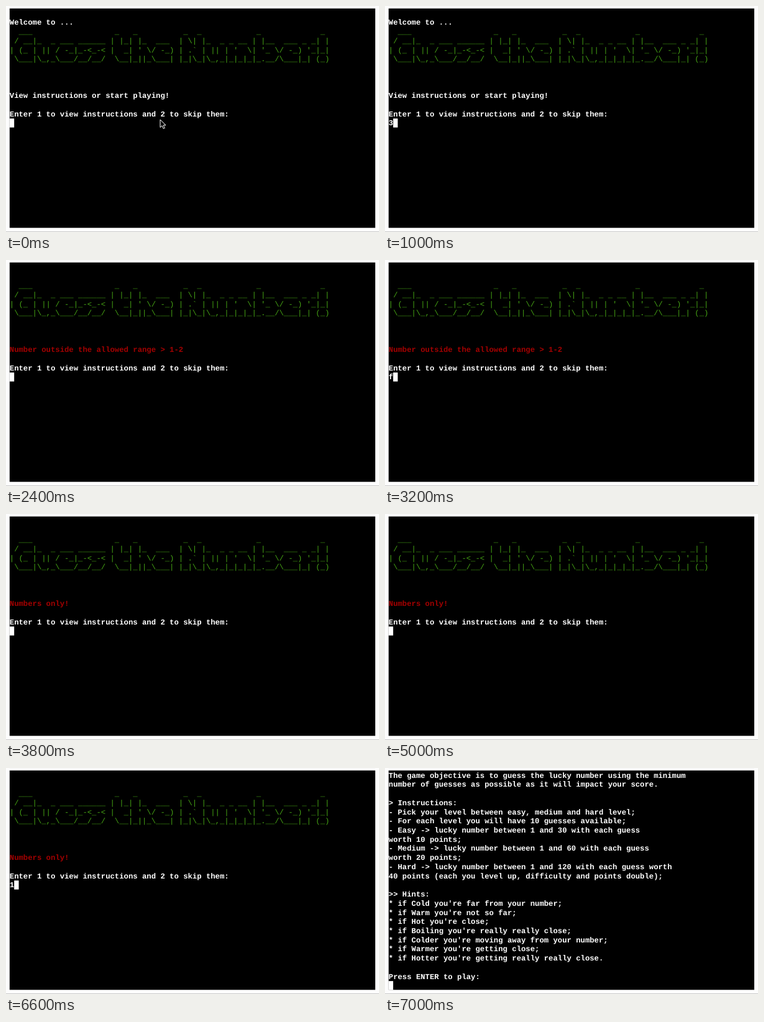
An HTML page that plays this animation: 600 by 364 pixels, repeating every 8000 ms.

```html
<!DOCTYPE html>
<html lang="en">
<head>
<meta charset="utf-8">
<title>Guess the Number</title>
<style>
  html, body { margin: 0; width: 100%; height: 100%; overflow: hidden; background: #fdfdfd; }
  svg { display: block; width: 600px; height: 364px; }
  text {
    font: bold 12.25px "Liberation Mono", "Courier New", monospace;
    text-rendering: geometricPrecision;
    white-space: pre;
    fill: #fff;
  }
  .error { fill: #a30000; }
  .banner { font-weight: normal; fill: #45a314; }
</style>
</head>
<body>
<svg viewBox="0 0 600 364">
  <rect width="600" height="364" fill="#fdfdfd"/>
  <rect y="363" width="600" height="1" fill="#c8c8c8"/>
  <rect x="5.8" y="4" width="588.2" height="353.3" fill="#000"/>
  <g id="screen"></g>
  <rect id="caret" width="7.35" height="14.4" fill="#fff"/>
  <path id="pointer" d="M248 183v12.5l3-2.7 2.2 4.8 2.1-1-2.2-4.6h3.9z" fill="#000" stroke="#fff"/>
</svg>

<script type="text/plain" id="banner">
  ___                  _   _          _  _            _             _
 / __|_  _ ___ ______ | |_| |_  ___  | \| |_  _ _ __ | |__  ___ _ _| |
| (_ | || / -_|_-<_-< |  _| ' \/ -_) | .` | || | '  \| '_ \/ -_) '_|_|
 \___|\_,_\___/__/__/  \__|_||_\___| |_|\_|\_,_|_|_|_|_.__/\___|_| (_)
</script>

<script type="text/plain" id="help">
The game objective is to guess the lucky number using the minimum
number of guesses as possible as it will impact your score.

> Instructions:
- Pick your level between easy, medium and hard level;
- For each level you will have 10 guesses available;
- Easy -> lucky number between 1 and 30 with each guess
worth 10 points;
- Medium -> lucky number between 1 and 60 with each guess
worth 20 points;
- Hard -> lucky number between 1 and 120 with each guess worth
40 points (each you level up, difficulty and points double);

>> Hints:
* if Cold you're far from your number;
* if Warm you're not so far;
* if Hot you're close;
* if Boiling you're really really close;
* if Colder you're moving away from your number;
* if Warmer you're getting close;
* if Hotter you're getting really really close.

Press ENTER to play:
</script>

<script>
const DURATION = 8000;
const LEFT = 5.8, TOP = 4, COLUMN = 7.35, ROW = 14.72, BASELINE = 11.7;
const byId = id => document.getElementById(id);
const readLines = id => byId(id).textContent.slice(1, -1).split("\n");
const screenGroup = byId("screen"), caret = byId("caret"), pointer = byId("pointer");
const banner = readLines("banner"), help = readLines("help");

const WELCOME = { welcome: true, message: "View instructions or start playing!" };
const RANGE = { error: true, message: "Number outside the allowed range > 1-2" };
const NUMBERS = { error: true, message: "Numbers only!" };

const scenes = [
  { at: 0, ...WELCOME, pointer: true },
  { at: 800, ...WELCOME, input: "3" },
  { at: 1400, ...RANGE },
  { at: 3200, ...RANGE, input: "f" },
  { at: 3800, ...NUMBERS },
  { at: 6600, ...NUMBERS, input: "1" },
  { at: 7000, help: true }
];

function print(row, content, className = "") {
  const line = document.createElementNS("http://www.w3.org/2000/svg", "text");
  line.setAttribute("x", LEFT);
  line.setAttribute("y", TOP + row * ROW + BASELINE);
  line.setAttribute("class", className);
  line.textContent = content;
  screenGroup.append(line);
}

function placeCaret(row, column) {
  caret.setAttribute("x", LEFT + column * COLUMN);
  caret.setAttribute("y", TOP + row * ROW + 0.6);
}

function show(scene) {
  screenGroup.replaceChildren();
  pointer.style.display = scene.pointer ? "" : "none";
  if (scene.help) {
    help.forEach((line, row) => print(row, line));
    placeCaret(23, 0);
    return;
  }
  const input = scene.input || "";
  if (scene.welcome) print(1, "Welcome to ...");
  banner.forEach((line, i) => print(2 + i, line, "banner"));
  print(9, scene.message, scene.error ? "error" : "");
  print(11, "Enter 1 to view instructions and 2 to skip them:");
  print(12, input);
  placeCaret(12, input.length);
}

let current;
const start = performance.now();

function tick() {
  const time = (performance.now() - start) % DURATION;
  const scene = scenes.findLast(s => s.at <= time);
  if (scene !== current) show(current = scene);
  requestAnimationFrame(tick);
}
tick();
</script>
</body>
</html>
```
